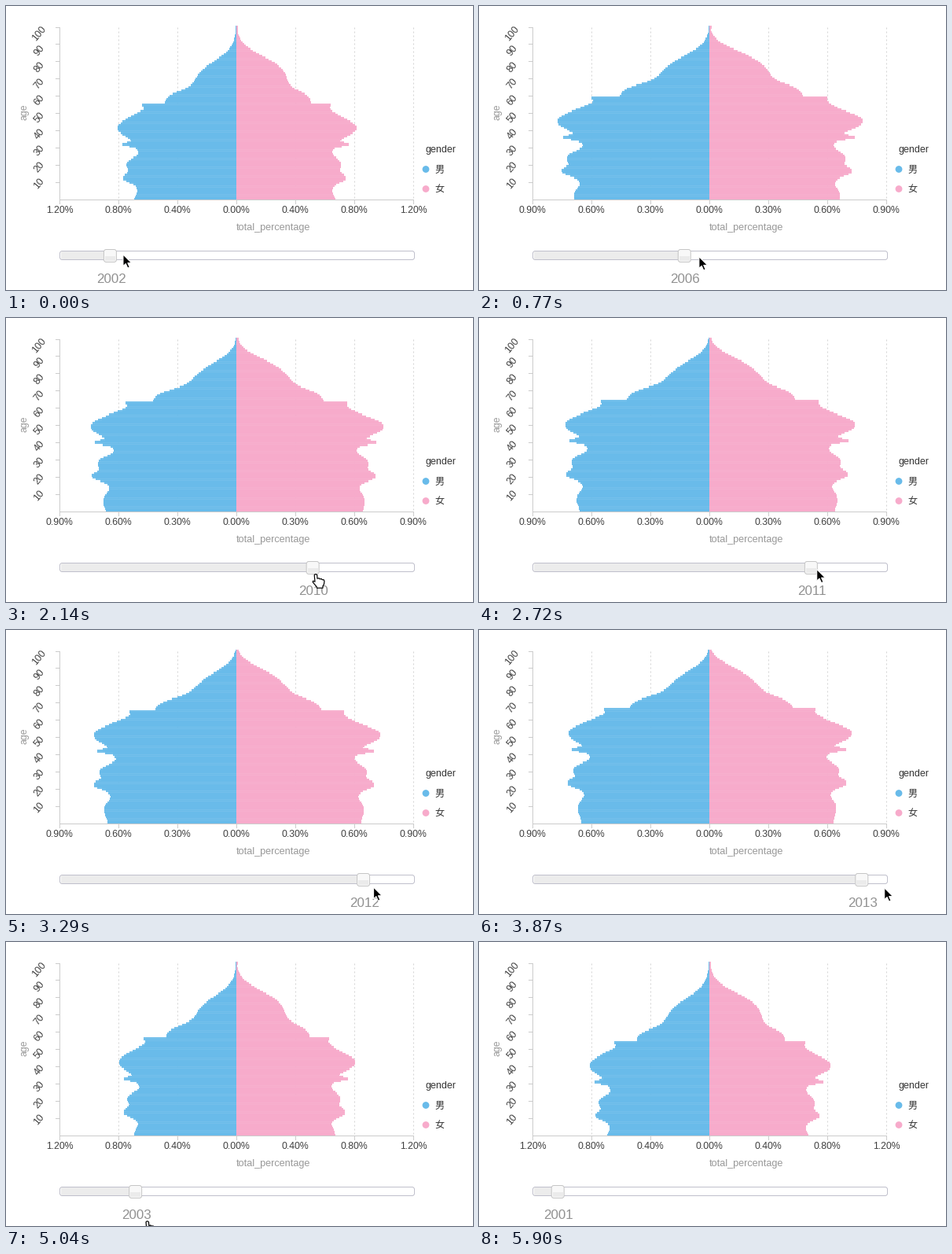
Write a matplotlib script that moves like this. It is 594 by 361 pixels and loops after 6.66 s.

```python
import numpy as np
import matplotlib.pyplot as plt
from matplotlib.animation import FuncAnimation
from matplotlib.collections import PolyCollection
from matplotlib.patches import Circle, FancyBboxPatch, Polygon, Rectangle

W, H, DPI = 594, 361, 100
LOOP, STEP = 6660, 20
LEFT, MID, RIGHT = 68, 293, 518
TOP, BASE = 27, 246
BLUE, PINK = "#69bbea", "#f7abcb"
AGES = np.arange(101)

# baby booms and gaps: centre (age in 2002) and width
WAVE_AT = np.array([-2, 5, 12.5, 20, 26.5, 32, 41.5, 53])
WAVE_WIDTH = np.array([3.5, 2.5, 2.2, 3.2, 2.2, .9, 4.4, 2.5])
MEN = dict(level=.68, old=.30, fade=80, spread=4.3, extra=.19, top=.004,
           waves=[.02, -.012, .085, .065, -.025, .08, .125, -.06])
WOMEN = dict(level=.66, old=.355, fade=83, spread=4, extra=.155, top=.012,
             waves=[.015, -.012, .08, .05, -.015, .09, .155, -.03])

# pointer strokes: start, end, year reached, pointer position reached
START = (2002, 149, 316)
STROKES = [
    (20, 280, 2004, 214, 318), (510, 860, 2006, 296, 319),
    (1100, 1390, 2008, 346, 322), (1570, 2230, 2010, 397, 326),
    (2260, 2310, 2010, 395, 311), (2520, 2970, 2012, 460, 327),
    (3210, 3870, 2013, 516, 328), (3900, 4050, 2014, 524, 328),
    (4290, 4460, 2011, 422, 327), (4460, 5040, 2003, 179, 355),
    (5280, 5690, 2001, 108, 311), (5820, 5900, 2001, 300, 380)]
HAND_TIMES = [(2000, 2520), (4930, 5300)]

ARROW = np.array([(0, 0), (0, 14.5), (3.3, 11.5), (5.8, 17), (8.2, 16),
                  (5.8, 10.6), (10.6, 10.6)])
HAND = np.array([(-1, 1), (0, 0), (1.5, 0), (2.5, 1), (2.8, 5.5), (5, 5),
                 (6, 6.2), (8, 5.8), (9, 7), (11, 7), (11.8, 9), (11.2, 13),
                 (9.8, 15), (9.8, 17.5), (2.2, 17.5), (2, 16), (-.5, 13),
                 (-3, 10), (-2.6, 8.5), (-.2, 9.5)])

plt.rcParams["font.family"] = ["Liberation Sans", "Noto Sans CJK JP"]
fig = plt.figure(figsize=(W / DPI, H / DPI), dpi=DPI, facecolor="white")
ax = fig.add_axes([0, 0, 1, 1])
ax.set(xlim=(0, W), ylim=(H, 0))
ax.axis("off")


def px(size):
    return size * 72 / DPI


def label(x, y, text, color="#404040", size=12.3, ha="center", **kw):
    va = "center" if "rotation" in kw else "center_baseline"
    return ax.text(x, y, text, color=color, fontsize=px(size), ha=ha, va=va, **kw)


def line(x0, y0, x1, y1, color="#cccccc", **kw):
    ax.plot([x0, x1], [y0, y1], color=color, lw=px(1), zorder=1, **kw)


def rounded(x, y, w, h, r, face, edge, z):
    box = FancyBboxPatch((x, y), w, h, fc=face, ec=edge, lw=px(1), zorder=z,
                         boxstyle=f"round,pad=0,rounding_size={r}")
    return ax.add_patch(box)


def age_y(age):
    return BASE - age * (BASE - TOP) / 100


def falloff(x, centre, width):
    return 1 / (1 + np.exp((x - centre) / width))


def share(year, sex):
    """Percentage per age: a 2002 profile that ages and shrinks by cohort."""
    cohort = AGES - (year - 2002)
    bumps = np.exp(-((cohort[:, None] - WAVE_AT) / WAVE_WIDTH) ** 2 / 2)
    young = sex["level"] + bumps @ np.array(sex["waves"])
    old = (sex["old"] * falloff(cohort, sex["fade"], sex["spread"])
           + sex["extra"] * falloff(cohort, 62.5, 1.7))
    age = np.maximum(cohort, 0)
    shrink = .004 + .00013 * age + .055 * np.exp((age - 80) / 10)
    value = np.where(cohort < 56, young, old) * np.exp(-shrink * (year - 2002))
    value[100] = max(value[100], sex["top"])
    return np.maximum(value, .003)


def bars(year, sex, limit, side):
    tip = MID + side * share(year, sex) / limit * (MID - LEFT)
    top = age_y(AGES) - 2
    bottom = np.minimum(top + 4, BASE)
    base = np.full(101, MID)
    xs = np.stack([base, tip, tip, base], axis=1)
    ys = np.stack([top, top, bottom, bottom], axis=1)
    return np.stack([xs, ys], axis=2)


def state(t):
    """Year (not yet snapped) and pointer position at time t."""
    now = np.array(START, float)
    for start, end, *goal in STROKES:
        p = np.clip((t - start) / (end - start), 0, 1)
        now += (np.array(goal) - now) * (1 - (1 - p) ** 1.3)
        if p < 1:
            break
    return now


# axes and grid
ticks_x = np.linspace(LEFT, RIGHT, 7)
for x in ticks_x:
    line(x - .5, BASE, x - .5, BASE + 5)
    if x not in (LEFT, MID):
        line(x - .5, TOP, x - .5, BASE, color="#d4d4d4", dashes=(2, 3))
line(LEFT, BASE - .5, RIGHT, BASE - .5)
line(LEFT - .5, TOP, LEFT - .5, BASE)
for age in range(10, 101, 10):
    line(LEFT - 5, age_y(age) - .5, LEFT, age_y(age) - .5)
    label(42.5, 247.5 - 2.12 * age, str(age), rotation=50)
x_labels = [label(x, 258.5, "") for x in ticks_x]
label(24, 135, "age", "#999999", rotation=90)
label(340, 280.5, "total_percentage", "#999999", 12.6)

# legend
label(553.5, 181.5, "gender", "#333333", 12.5)
for y, color, name in ((207.5, BLUE, "男"), (232.5, PINK, "女")):
    ax.add_patch(Circle((534, y), 4.4, fc=color, lw=0))
    label(545, y, name, "#333333", 12, ha="left")

men = PolyCollection([], fc=BLUE, lw=0, alpha=.92, zorder=3)
women = PolyCollection([], fc=PINK, lw=0, alpha=.94, zorder=3)
ax.add_collection(men, autolim=False)
ax.add_collection(women, autolim=False)

# slider
rounded(68.5, 311.5, 451, 11, 3, "white", "#c0c0cc", 4)
filled = ax.add_patch(Rectangle((69.5, 312), 1, 10, fc="#ececec", lw=0, zorder=5))
handle = rounded(0, 309.5, 16, 16, 3, "#f8f8f8", "#c6c6c6", 6)
shade = ax.add_patch(Rectangle((0, 317.5), 13, 6.5, fc="#ebebeb", lw=0, zorder=7))
year_label = label(0, 345.5, "", "#929292", 17)
pointer = ax.add_patch(Polygon(ARROW, closed=True, zorder=9, joinstyle="round"))


def draw_pointer(t, x, y):
    hand = any(a <= t < b for a, b in HAND_TIMES)
    pointer.set_xy((HAND if hand else ARROW) + (x, y))
    pointer.set(fc="white" if hand else "black", ec="black" if hand else "white",
                lw=px(1.2 if hand else 1))


def update(i):
    t = i * STEP
    position, pointer_x, pointer_y = state(t)
    year = round(position)
    limit = 1.2 if year < 2004 else .9
    men.set_verts(bars(year, MEN, limit, -1))
    women.set_verts(bars(year, WOMEN, limit, 1))
    for text, value in zip(x_labels, np.linspace(-limit, limit, 7)):
        text.set_text(f"{abs(value):.2f}%")
    x = 68 + (year - 2000) * 451 / 14
    filled.set_width(x - 69.5)
    handle.set_x(x - 8)
    shade.set_x(x - 6.5)
    year_label.set_text(str(year))
    year_label.set_x(x + 1.2)
    draw_pointer(t, pointer_x, pointer_y)
    return ()


anim = FuncAnimation(fig, update, frames=LOOP // STEP, interval=STEP,
                     repeat=True, repeat_delay=0, blit=False)
plt.show()
```
